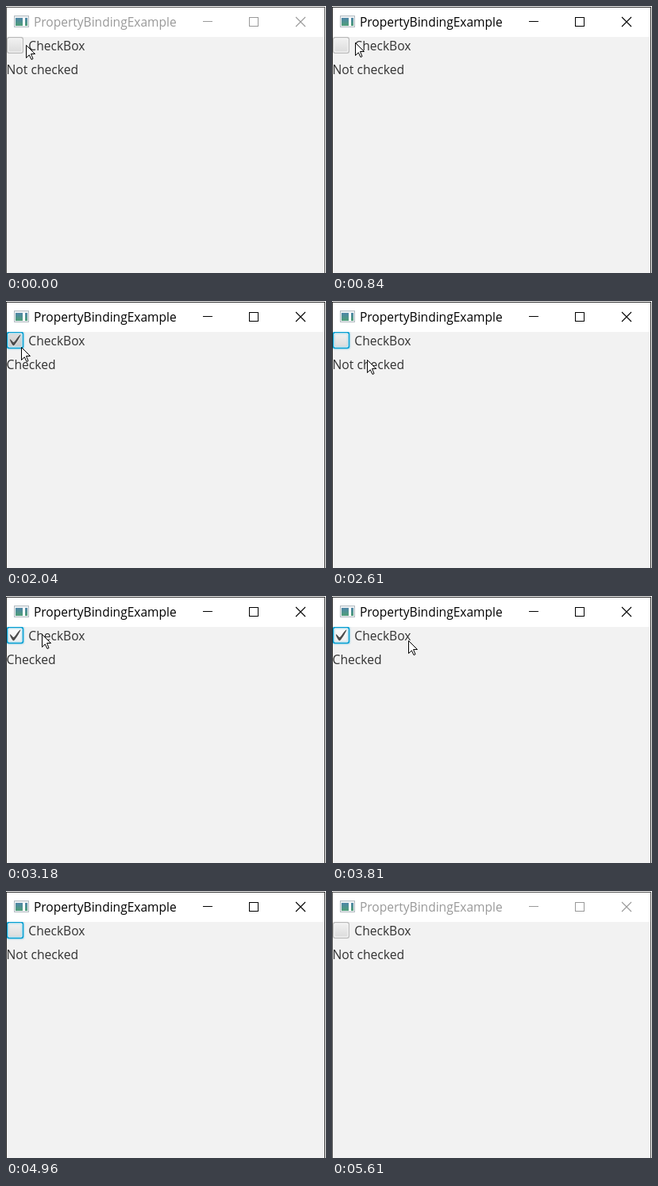
An HTML page with a canvas for the animation above (5710 ms loop, 403x337 px).

```html
<!DOCTYPE html>
<html lang="en">
<head>
<meta charset="utf-8">
<title>Property binding</title>
<style>
  html, body { margin: 0; width: 100%; height: 100%; overflow: hidden; background: #f2f2f2; }
  canvas { display: block; }
</style>
</head>
<body>
<canvas id="stage" width="403" height="337"></canvas>
<script>
const ctx = document.getElementById('stage').getContext('2d');
const LOOP = 5710;

// Each step changes only the properties it names.
const steps = [
  { at: 0, cursor: [25, 49], active: false, focused: false, checked: false, look: 'idle' },
  { at: 150, cursor: [29, 46] },
  { at: 840, active: true },
  { at: 980, focused: true, checked: true, look: 'hover' },
  { at: 1230, cursor: [26, 53] },
  { at: 1380, cursor: [26, 71], look: 'idle' },
  { at: 1500, cursor: [25, 71] },
  { at: 1650, cursor: [25, 69] },
  { at: 1770, cursor: [23, 62] },
  { at: 1890, cursor: [21, 58], look: 'hover' },
  { at: 2040, cursor: [19, 58], look: 'pressed' },
  { at: 2190, checked: false, look: 'hover' },
  { at: 2310, cursor: [32, 91], look: 'idle' },
  { at: 2460, cursor: [34, 91] },
  { at: 2610, cursor: [44, 74] },
  { at: 2760, cursor: [46, 55], look: 'hover' },
  { at: 2880, cursor: [46, 48] },
  { at: 3030, cursor: [45, 48], look: 'pressed' },
  { at: 3180, checked: true, look: 'hover' },
  { at: 3300, cursor: [45, 68], look: 'idle' },
  { at: 3420, cursor: [47, 87] },
  { at: 3570, cursor: [56, 84] },
  { at: 3690, cursor: [78, 70] },
  { at: 3810, cursor: [96, 56], look: 'hover' },
  { at: 4210, look: 'pressed' },
  { at: 4360, checked: false, look: 'idle' },
  { at: 4510, cursor: [301, 188] },
  { at: 4660, cursor: [354, 289] },
  { at: 4810, cursor: [356, 329] },
  { at: 4960, cursor: null },
  { at: 5610, active: false, focused: false }
];

const fills = {
  idle: ['#f1f1f1', '#dcdcdc'],
  hover: ['#fcfcfc', '#efefef'],
  pressed: ['#dedede', '#cbcbcb']
};

const checkMark = new Path2D('M-.25 6.083c.843-.758 4.583 4.833 5.75 4.833' +
  'S14.5-1.5 15.917-.917c1.292.532-8.75 17.083-10.5 17.083C3 16.167-1.083 6.833-.25 6.083z');
const arrow = new Path2D('M.5.5V16.5L4.3 12.8L7 18.5L9 17.6L6.5 11.5H11.5Z');

function rect(x, y, w, h, fill) {
  ctx.fillStyle = fill;
  ctx.fillRect(x, y, w, h);
}

function boxLayer(inset, radius, fill) {
  const size = 21 - 2 * inset;
  ctx.beginPath();
  ctx.roundRect(1 + inset, 39 + inset, size, size, radius);
  ctx.fillStyle = fill;
  ctx.fill();
}

function text(string, x, y, size, color) {
  ctx.font = `${size}px "Open Sans", "Noto Sans", sans-serif`;
  ctx.fillStyle = color;
  ctx.fillText(string, x, y);
}

function vertical(y0, y1, [top, bottom]) {
  const gradient = ctx.createLinearGradient(0, y0, 0, y1);
  gradient.addColorStop(0, top);
  gradient.addColorStop(1, bottom);
  return gradient;
}

function drawIcon() {
  const teal = vertical(15, 25, ['#4f86a8', '#4f9f78']);
  rect(10, 12, 19, 15, '#b4bcc2');
  rect(11, 13, 17, 13, '#eef1f3');
  rect(12, 15, 9, 10, teal);
  rect(21, 15, 3, 10, '#fff');
  rect(24, 15, 3, 10, teal);
}

function drawWindow(active) {
  const ink = active ? '#000' : '#999';
  rect(0, 0, 403, 337, '#fff');
  rect(0, 1, 402, 336, active ? '#2b2b2b' : '#505050');
  rect(1, 2, 400, 37, '#fff');
  rect(1, 39, 400, 298, '#f2f2f2');
  drawIcon();

  text('PropertyBindingExample', 34.9, 26, 15.55, ink);
  rect(248, 19, 12, 1, ink);
  ctx.strokeStyle = ink;
  ctx.lineWidth = 1;
  ctx.strokeRect(306.5, 14.5, 11, 11);
  ctx.lineWidth = 1.1;
  ctx.stroke(new Path2D('M365 14L377 26M377 14L365 26'));
}

function drawCheckBox({ focused, checked, look }) {
  const body = vertical(41, 58, fills[look]);
  ctx.save();
  ctx.beginPath();
  ctx.rect(1, 39, 400, 298);
  ctx.clip();
  boxLayer(focused ? -0.25 : 0, 3, focused ? '#039ed3' : '#bababa');
  boxLayer(1.25, 2, '#f8f8f8');
  boxLayer(2.4, 1.5, body);
  if (focused) {
    boxLayer(-1.75, 4, '#039ed322');
    boxLayer(3.25, 1, body);
  }
  ctx.restore();
  if (checked) drawCheckMark();
}

function drawCheckMark() {
  for (const [dy, color] of [[1, '#f4f4f4'], [0, '#4b4b4b']]) {
    ctx.save();
    ctx.translate(5.2, 43.2 + dy);
    ctx.scale(0.82, 0.82);
    ctx.fillStyle = color;
    ctx.fill(checkMark);
    ctx.restore();
  }
}

function drawCursor([x, y]) {
  ctx.save();
  ctx.translate(x, y);
  ctx.fillStyle = '#fff';
  ctx.fill(arrow);
  ctx.strokeStyle = '#000';
  ctx.lineWidth = 1;
  ctx.stroke(arrow);
  ctx.restore();
}

function draw(time) {
  const state = Object.assign({}, ...steps.filter(step => step.at <= time));
  drawWindow(state.active);
  drawCheckBox(state);
  text('CheckBox', 28.3, 56, 15.6, '#323232');
  text(state.checked ? 'Checked' : 'Not checked', 0.5, 86, 15.7, '#323232');
  if (state.cursor) drawCursor(state.cursor);
}

const start = performance.now();
function frame() {
  draw((performance.now() - start) % LOOP);
  requestAnimationFrame(frame);
}
frame();
</script>
</body>
</html>
```
